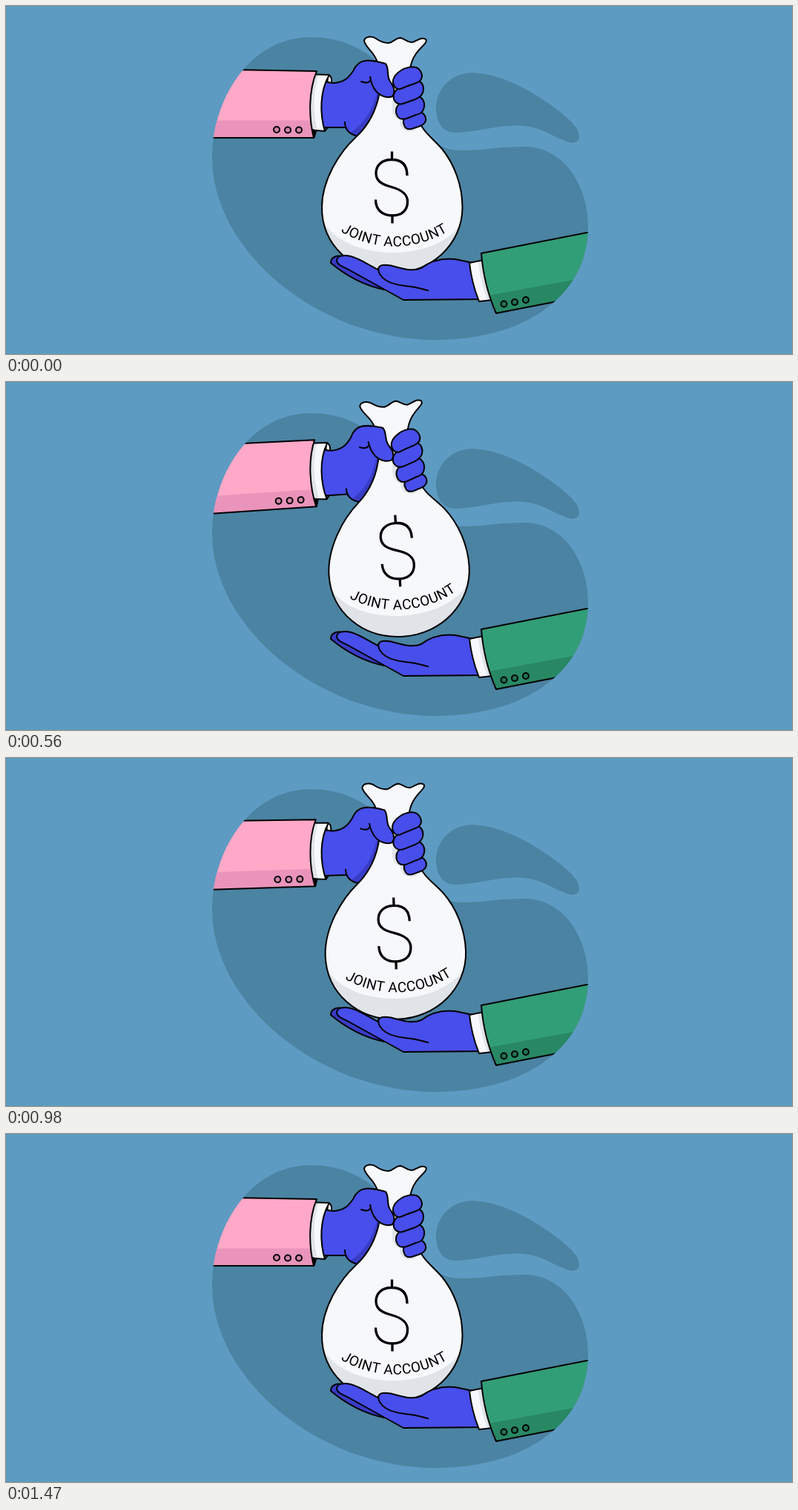
Recreate the animation shown at these times as an HTML page with a canvas. Size 1060x470 px, loop 2450 ms.

```html
<!DOCTYPE html>
<html lang="en">
<head>
<meta charset="utf-8">
<title>Joint account</title>
<style>
  html, body { margin: 0; width: 100%; height: 100%; overflow: hidden; background: #5e9bc3; }
  canvas { display: block; }
</style>
</head>
<body>
<canvas id="stage" width="1060" height="470"></canvas>
<script>
const ctx = document.getElementById('stage').getContext('2d');
const LOOP = 2450, STEP = 70;
const PIVOT = { x: 272, y: 125 };
const C = {
  bg: '#5e9bc3', blob: '#4b83a2', ink: '#000', white: '#f7f8fb', gray: '#e0e4e9',
  blue: '#474eeb', navy: '#383cc6', pink: '#ffa8c7', rose: '#ea94bb',
  green: '#329e78', moss: '#288863', plum: '#d083a6', pine: '#217352'
};

const blob = new Path2D(`M278 205C278 330 420 451 580 451C692 451 785 397 785 297
  C785 240 750 190 700 190C665 190 640 195 617 195C600 195 590 192 583 187
  C545 160 540 105 500 75C475 53 445 42 412 42C327 42 278 128 278 205Z`);
const drop = new Path2D(`M580 138C580 110 603 90 629 90C664 91 705 111 742 139
  C762 154 773 166 773 176C773 184 767 186 759 184C738 178 722 161 687 161.5
  C656 162 632 171 606 171C589 171 580 157 580 138Z`);
const bag = new Path2D(`M483 47C484 41 493 40 499 44C506 49 511 50 516 50C523 49 525 43 532 43
  C538 44 540 49 547 49C554 48 559 41 566 45C568 47 566 50 563 53C554 62 548 69 545 84
  L555 152C562 170 576 179 588 193C605 214 615.5 243 615.5 272C615.5 322 573 361 520.5 361
  C466 361 426 322 426 272C426 235 450 197 472 177C488 162 500 140 504 115L501 77
  C498 63 485 57 483 47Z`);

function fill(d, color) {
  ctx.fillStyle = color;
  ctx.fill(d instanceof Path2D ? d : new Path2D(d));
}

function line(d, width = 2) {
  ctx.lineWidth = width;
  ctx.strokeStyle = C.ink;
  ctx.stroke(d instanceof Path2D ? d : new Path2D(d));
}

function shape(d, color) {
  fill(d, color);
  line(d);
}

function buttons(spots, color) {
  for (const [x, y] of spots) {
    const dot = new Path2D();
    dot.arc(x, y, 4, 0, Math.PI * 2);
    shape(dot, color);
  }
}

function clipped(path, draw) {
  ctx.save();
  ctx.clip(path);
  draw();
  ctx.restore();
}

function swing(angle) {
  ctx.translate(PIVOT.x, PIVOT.y);
  ctx.rotate(-angle * Math.PI / 180);
  ctx.translate(-PIVOT.x, -PIVOT.y);
}

function arcText(text, cx, cy, r) {
  ctx.font = '400 19px Roboto, Arial, sans-serif';
  ctx.fillStyle = C.ink;
  ctx.textAlign = 'center';
  ctx.textBaseline = 'alphabetic';
  const gap = 0.5;
  const widths = [...text].map(ch => ctx.measureText(ch).width + gap);
  let pos = -widths.reduce((a, b) => a + b, 0) / 2;
  [...text].forEach((ch, i) => {
    ctx.save();
    ctx.translate(cx, cy);
    ctx.rotate(-(pos + widths[i] / 2) / r);
    ctx.fillText(ch, 0, r);
    ctx.restore();
    pos += widths[i];
  });
}

function pinkSleeve() {
  const body = 'M200 84L419 88C408 115 408 150 415 178L200 178Z';
  shape('M413 167L418 169L415.5 178Z', C.ink);
  fill(body, C.pink);
  clipped(new Path2D(body), () => fill('M190 154.5H430V190H190Z', C.rose));
  line(body);
  buttons([[365, 167], [380, 167.5], [395, 167.5]], C.plum);
}

function palm() {
  shape('M434 93C440 94 440 102 438 106L425 130L434 164L430 169Z', C.white);
  fill(`M425 103L440 104C455 104 462 97 468 88C472 79 477 75 484 74
    C495 73 505 76 512 78L512 125L482 178C466 175 458 170 457 164L425 164Z`, C.blue);
  fill('M500 119C492 146 481 160 464 171L474 178C492 162 503 140 507 119Z', C.navy);
  line(`M429 102L440 104C455 104 462 97 468 88C472 79 477 75 484 74C495 73 505 76 512 78
    M428 164L458 164`);
  line('M457 156C457 168 465 174 475 176');
  const cuff = 'M405 92L436 93C423 115 423 145 430 169L405 167Z';
  fill(cuff, C.white);
  fill('M405 92L422 92C414 115 414 145 420 168L405 167Z', C.gray);
  line(cuff);
}

function moneyBag() {
  fill(bag, C.white);
  clipped(bag, () => {
    fill('M424 284C452 349 590 349 618 286L620 370L420 370Z', C.gray);
    fill('M523 122C518 142 522 152 531 154C530 166 540 172 552 168L562 150Z', C.gray);
  });
  line(bag);
  line(`M520.5 196.5V208M541 229C541 214 533 207.5 520 207.5C506 207.5 499 216 499 226
    C499 237 508 241 520 244.5C534 248.5 541.5 254 541.5 264C541.5 276 534 283 521 283
    C507 283 498.5 275 498.5 261.5M521 283V293.5`, 3.3);
  arcText('JOINT ACCOUNT', 523.5, 185, 139.5);
}

function grip() {
  const thumb = new Path2D(`M484 74C495 73 505 76 512 78C517 84 513 95 518 102C524 110 525 117 521 122
    C515 125 505 122 499 115C494 109 492 102 491 95`);
  shape(thumb, C.blue);
  ctx.lineCap = 'round';
  line('M479 102C484 104 489 104 491 101');
  ctx.lineCap = 'butt';
  [
    'M537 161C534 155 538 150 543 147L556 143C563 143 567 149 566 155C564 161 559 162 556 163L547 166C541 167 538 165 537 161Z',
    'M527 147C524 139 528 133 535 129L553 122C560 121 565 128 564 136C563 143 559 146 553 147L540 152C533 154 529 152 527 147Z',
    'M523 126C521 118 525 113 533 109L551 101C559 99 563 106 563 112C563 119 559 123 552 126L538 131C531 134 526 132 523 126Z',
    'M522 104C521 96 527 90 536 85C546 81 555 81 559 88C563 95 561 101 553 104C545 107 538 109 532 112C527 113 523 110 522 104Z'
  ].forEach(d => shape(d, C.blue));
}

function lowerArm() {
  shape('M438 347C438 339 446 336 456 338L510 383C480 377 456 362 438 347Z', C.navy);
  shape(`M446 344C446 337 456 336 465 338C479 342 489 350 502 356C502 349 511 349 519 350.5
    C535 355 548 359 560 354C573 344 588 340 606 342L630 347L640 396L536 397
    L462 356C454 352 447 350 446 344Z`, C.blue);
  line('M502 355C503 369 519 376 538 378C552 379 561 382 570 384.5');
  const cuff = 'M625 347L644 343L656 397L638 399C632 384 627 366 625 347Z';
  fill(cuff, C.white);
  fill('M637 345L646 343L658 397L650 398C643 382 639 364 637 345Z', C.gray);
  line(cuff);
  clipped(blob, () => {
    const sleeve = 'M641 334L830 297L830 382L661 415C650 390 643 360 641 334Z';
    fill(sleeve, C.green);
    clipped(new Path2D(sleeve), () => fill('M640 393L830 358V430H640Z', C.moss));
    line(sleeve);
    buttons([[671.5, 402.5], [686, 400], [701, 397]], C.pine);
  });
}

const sine = u => (1 - Math.cos(Math.PI * u)) / 2;

// One lift: five steps up, five steps down.
function lift(step, start, peak) {
  const u = (step - start) / 5;
  if (u <= 0 || u >= 2) return 0;
  return peak * (u < 1 ? (u + sine(u)) / 2 : sine(2 - u));
}

function render(time) {
  const step = Math.floor((time % LOOP) / STEP);
  const angle = lift(step, 1, 5.9) + lift(step, 11, 2.95);
  ctx.lineJoin = 'round';
  ctx.fillStyle = C.bg;
  ctx.fillRect(0, 0, 1060, 470);
  fill(blob, C.blob);
  fill(drop, C.blob);

  ctx.save();
  swing(angle);
  palm();
  ctx.restore();

  clipped(blob, () => { swing(angle); pinkSleeve(); });

  ctx.save();
  swing(angle);
  moneyBag();
  grip();
  ctx.restore();

  lowerArm();
}

const begin = performance.now();
function tick() {
  render(performance.now() - begin);
  requestAnimationFrame(tick);
}
tick();
</script>
</body>
</html>
```
